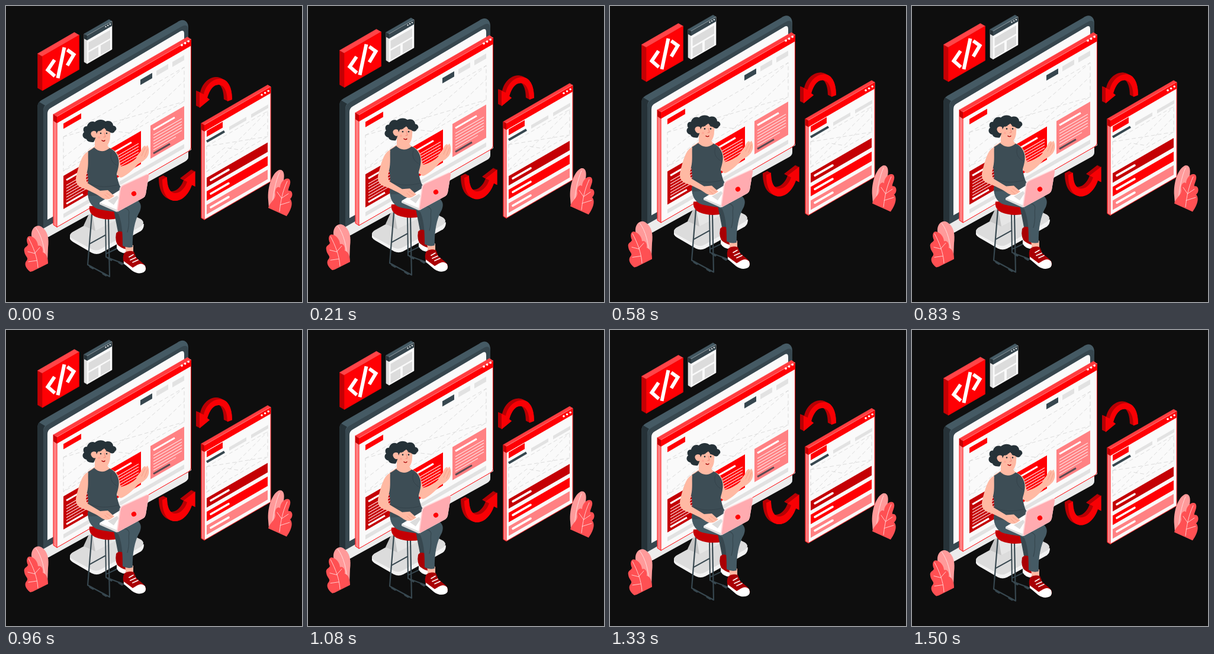
An HTML page that plays this animation: 500x500 px, repeating every 1.54 s.

```html
<!DOCTYPE html>
<html lang="en">
<head>
<meta charset="utf-8">
<title>Web design</title>
<style>
html, body { margin: 0; width: 100%; height: 100%; overflow: hidden; background: #0e0e0e; }
svg { display: block; width: 100vw; height: 100vh; }
</style>
</head>
<body>
<svg id="stage" viewBox="0 0 500 500"></svg>
<script>
const K = 0.577; // slope of the isometric right-hand axis
const RED = '#ff0004', DEEP = '#c40004', PINK = '#ff8183', PAPER = '#fafafa',
      GREY = '#e2e2e2', SLATE = '#455a64', INK = '#37474f', NIGHT = '#263238', SKIN = '#ffb9a3';

const fill = (d, c, extra = '') => `<path d="${d}" fill="${c}" ${extra}/>`;
const line = (d, c, w, extra = '') =>
  `<path d="${d}" fill="none" stroke="${c}" stroke-width="${w}" stroke-linecap="round" stroke-linejoin="round" ${extra}/>`;
const quad = (x, y, w, h, c, extra) => fill(`M${x},${y}l${w},${-w * K}v${h}l${-w},${w * K}z`, c, extra);
const rule = (x, y, w, c, t) => line(`M${x},${y}l${w},${-w * K}`, c, t, 'style="stroke-linecap:butt"');
const dot = (x, y, r, c) => `<circle cx="${x}" cy="${y}" r="${r}" fill="${c}"/>`;
const range = n => [...Array(n).keys()];

// Slab seen from the left and above; x, y is the front top-left corner
function slab(x, y, w, h, dx, dy, front, top, side) {
  const soft = c => `stroke="${c}" stroke-width=".6" stroke-linejoin="round"`;
  return fill(`M${x},${y}l${-dx},${-dy}v${h}l${dx},${dy}z`, side, soft(side)) +
    fill(`M${x},${y}l${-dx},${-dy}l${w},${-w * K}l${dx},${dy}z`, top, soft(top)) +
    quad(x, y, w, h, front, soft(front));
}

function dots(x, y, step, r) {
  return range(3).map(i => dot(x + i * step, y - i * step * K, r, '#fff')).join('');
}

function dashes(x, y, w, h) {
  const rise = w * K, top = y - rise, r = x + w;
  return line(`M${x},${y}L${r},${top}V${top + h}L${x},${y + h}Z` +
    `M${x},${y + h}L${r},${top}M${x},${y}L${r},${top + h}` +
    `M${x},${y + h * .6}l${w * .3},${-rise * .4}l${w * .25},${h * .1}L${r},${top + h * .4}`,
    '#d3d3d3', .8, 'stroke-dasharray="6 5"');
}

function monitor() {
  return fill('M108,387V393Q109,396 114,399L145,417Q153,421 161,417L228,380Q233,376 233,368Z', '#f2f2f2') +
    fill('M112,382L188,340L228,360Q236,366 228,372L161,410Q153,415 145,411L112,393Q104,388 112,382Z', '#dcdcdc') +
    fill('M131,371L143,345L196,320L194,358L151,380Z', '#c6c6c6') +
    fill('M146,352L196,325L194,358L151,380Z', '#e6e6e6') +
    fill('M53,172Q53,163 60,159L289,27.5Q298,21 304,26Q308,29 308,38V258L63,386L53,376Z', SLATE) +
    fill('M53,172Q53,165 56,162L66,168Q63,171 63,177V388L53,379Z', NIGHT) +
    fill('M63,179Q63,170 70,166L296,35Q308,28 308,42V240L63,380Z', INK) +
    fill('M70,182Q70,175 76,172L294,43Q301,39 301,47V232L70,361Z', PAPER) +
    fill('M63,376L308,237V254Q308,260 302,263L72,390Q63,393 63,387Z', '#ececec');
}

function card(x, y, c, end) {
  const lines = range(6).map(i => rule(x + 5, y + 16 + i * 5, i === 5 ? 38 : 48, '#ffe3e3', 1.1)).join('');
  return quad(x, y, 57, 56, c) + rule(x + 5, y + 7, 36, '#fff', 3) + lines + rule(x + 5, y + 47, 28, end, 3);
}

function bigWindow() {
  return slab(86, 187, 226.500, 186.500, 6, 4, PAPER, '#ff3d40', PINK) +
    line('M86,187V373.500L308,245.500Q312.500,243 312.500,239V57', RED, 1) +
    line('M80,183V369.500L86,373.500', RED, .8) +
    quad(86, 187, 226.500, 11, RED) +
    fill('M80,183L86,187V198L80,194Z', DEEP) + dots(297, 66, 5.600, 1.900) +
    quad(97, 198.500, 30, 9, RED) + quad(227, 124.500, 20, 9, INK) +
    quad(254, 109.500, 20, 8.500, GREY) + quad(281, 94.500, 20, 8.500, GREY) +
    dashes(97, 221, 204, 58) +
    card(97, 287, DEEP, '#fff') + card(171, 244, RED, '#fff') + card(244, 202, PINK, '#5b4a52') +
    quad(97, 351, 204, 7, GREY);
}

function sideWindow() {
  const bands = [DEEP, RED, PINK].map((c, i) => {
    const y = 290 + i * 23;
    return quad(339, y, 103, 16, c) + line(`M346,${y + 4}l30,${-30 * K}`, '#fff', 3.6);
  }).join('');
  return slab(335, 201, 112, 160, 5, 3, PAPER, '#ff3d40', PINK) +
    line('M330,198V358L335,361L447,296.400V137M335,201V361', RED, .9) +
    quad(335, 201, 112, 11, RED) + fill('M330,198L335,201V212L330,209Z', DEEP) +
    dots(432, 150, 5.6, 1.8) +
    quad(339, 211, 27, 10, RED) + rule(339, 229, 30, INK, 4) +
    quad(377, 204, 29, 6, GREY) + quad(414, 183, 29, 6, GREY) +
    dashes(339, 237, 103, 43) + bands;
}

function smallWindow() {
  return slab(137, 50, 42, 47.5, 5, 3, PAPER, SLATE, '#dedede') +
    quad(137, 50, 42, 8, INK) + fill('M131.7,47L137,50V58L131.7,55Z', NIGHT) +
    dots(168.5, 35, 3.7, 1.1) +
    quad(139.5, 61.5, 36.5, 14, '#dcdcdc') +
    quad(139.5, 78.5, 16.5, 15.5, '#dcdcdc') + quad(160, 66.5, 16, 16, '#dcdcdc');
}

function icon() {
  return slab(61.5, 85, 62, 58, 8, 4.6, RED, '#ff4448', DEEP) +
    `<g fill="none" stroke="#fff" stroke-width="6">
      <path d="M82,91L70.5,108L82.500,118.500M103.500,74L114.500,82L103.500,100.500M98.500,70L87.500,122"/></g>`;
}

function arrow(d) {
  const back = range(7).map(i => `<path d="${d}" fill="#b70004" transform="translate(${-6 + i},${-3 + i / 2})"/>`);
  return back.join('') + fill(d, '#f80004');
}

function leaves() {
  const RIB = '#ffd9d9', LEAF = '#ff5053', PALE = '#ff9a9a';
  return fill('M443,328C441,305 450,282 461,277C469,275 471,284 469,294L464,345L444,341Z', PALE) +
    line('M462,281C455,297 451,318 450,338', RIB, 1) +
    fill('M443,341C446,331 455,327 455,319C453,309 459,303 463,307C463,297 473,288 479,293C483,299 476,308 477,312C484,310 486,321 480,326C486,333 481,345 474,355Z', LEAF) +
    line('M475,296C467,313 464,330 462,347M465,325L477,317M463,336L479,331M465,324L458,314', RIB, .9) +
    fill('M43,388C42,375 52,368 60,373C71,380 73,394 71,408L70,434L52,440Z', PALE) +
    line('M50,374C60,387 66,409 66,432', RIB, 1) +
    fill('M41,449C33,443 30,435 35,430C39,425 32,423 31,415C29,407 36,407 37,403C33,394 36,387 42,389C49,391 54,399 54,405C61,403 63,411 62,416C68,417 71,426 71,435L45,448Z', LEAF) +
    line('M38,392C46,407 53,424 54,442M49,418L37,415M52,430L38,432M49,417L57,408', RIB, .9);
}

function stool() {
  return line('M168,355L169,424M190,355L197,412M141,402L168,387M169,424L206,438M170,418L191,408', INK, 2) +
    line('M145,352L138,437L175,457L173,358', INK, 2.2) +
    line('M142,440L147,443M164,452L169,455M173,426L178,429M191,433L196,436', INK, 3.4) +
    fill('M141,338Q139,350 151,356Q168,363 189,359L190,336Z', '#c40004');
}

function legs() {
  return fill('M182,345L212,340L203,386L189,381Z', INK) +
    fill('M186,384Q190,378 198,382L203,413L192,408Q183,399 186,384Z', '#a90004') +
    fill('M187,402Q194,409 203,411L202,418Q191,417 187,409Z', '#fff') +
    fill('M201,403L215,404L215,419L203,420Z', SKIN) +
    fill('M138,314C138,328 143,339 156,343C172,347 184,346 190,351C197,368 197,390 197,405Q206,410 214,407C213,386 217,362 226,347C232,333 223,326 208,321L190,301Z', SLATE) +
    line('M183,343C195,338 207,341 208,348C206,358 210,366 205,382', INK, 1.2) +
    fill('M200,417Q207,412 216,415L220,425L233,436Q239,443 234,448Q226,453 217,449L199,434Q196,424 200,417Z', '#a90004') +
    fill('M219,439Q229,432 235,439Q238,447 232,450Q223,454 213,447L199,435L199,431L214,442Z', '#fff') +
    line('M208,424L215,420M210,429L219,425M214,433L223,429', '#fff', 1.7);
}

function body() {
  return fill('M174,240C184,242 190,250 191,258L194,271C204,269 214,263 220,257C222,250 227,248 229,242C232,236 236,234 236,238L239,235C243,242 242,250 238,256C233,262 228,264 222,268C212,279 203,287 194,290C187,288 184,276 181,262Z', SKIN) +
    line('M229,253L235,240M234,255L239,242', '#f0957f', .7) +
    fill('M150,225L150,237L138,245L150,253H174L180,243L173,238L168,230Z', SKIN) +
    fill('M138,246C143,243 146,241 149,239Q161,251 175,240C183,243 188,250 190,258C192,267 189,276 187,283C188,292 190,297 192,304L187,319L139,321C138,305 140,292 137,280C134,266 135,251 138,246Z', '#3d4d55') +
    line('M178,247C174,258 181,266 187,269M142,300C155,307 174,306 189,302', NIGHT, .8, 'opacity=".45"');
}

function laptop() {
  return fill('M158,332L192,311L199,318L187,347Z', '#fff') +
    fill('M158,332L187,344V348L158,335Z', '#dedede') +
    fill('M172,329L188,320L190,324L182,336Z', '#dcdcdc') +
    fill('M192,308Q193,304 197,302L237,284Q242,282 241,288L236,318Q235,322 232,324L190,347Q186,349 187,344Z', '#ffd7d9') +
    fill('M194,308Q195,305 198,303.5L238,285Q242,284 241,288L236,318Q235,322 232,324L191,346Q188,347 189,343Z', '#ffabb0') +
    `<ellipse cx="216" cy="317" rx="4.2" ry="4" fill="${RED}" transform="rotate(-30 216 317)"/>` +
    fill('M139,246C129,249 124,266 119,286C116,297 120,304 128,307C141,312 150,316 159,322C165,327 172,328 177,325L183,321L172,311L159,312L139,300C134,296 135,288 137,280C140,268 138,254 139,246Z', SKIN) +
    line('M167,319L174,325M170,316L179,322', '#f0957f', .7);
}

function head() {
  return fill('M150,206L150,226C150,237 157,242 163,241C171,239 176,230 176,220L177,206L160,199Z', SKIN) +
    fill('M148,230C141,230 137,229 136,225C130,224 127,217 132,213C129,208 131,203 137,203C138,197 145,193 150,196C155,191 164,191 168,195C174,192 181,196 181,202C187,203 188,209 184,211C182,216 177,215 174,212C170,211 168,208 166,206C162,210 157,210 155,212C152,216 152,224 148,230Z', NIGHT) +
    fill('M152,212C146,209 142,214 144,218C146,223 151,224 154,220Z', SKIN) +
    dot(160, 215, 1.3, NIGHT) + dot(170, 215, 1.3, NIGHT) +
    line('M157,211L161,209.500M169,210L173,211', NIGHT, 1.1) +
    line('M166,214L168,221L165,221.500', '#ee8273', .9) +
    line('M162,227Q165,229.500 167,227', '#a90004', 1.4) +
    dot(157, 222, 2, '#ffa996');
}

const stage = document.getElementById('stage');
stage.innerHTML = `<g id="scene">${[
  monitor(), bigWindow(), smallWindow(),
  arrow('M382,158C382,136 374,122 360,123C347,124 337,135 334,149L327,146L327,172L344,158L340,155C344,141 351,132 360,133C370,134 374,147 374,161Z'),
  sideWindow(),
  arrow('M264,293L272,289C272,306 277,317 287,316C296,315 303,306 306,297L300,294L319.5,279L319.5,305L314,302C310,315 300,328 287,329C272,330 264,315 264,293Z'),
  leaves(), stool(), legs(), body(), laptop(), head()
].join('')}</g><g id="icon">${icon()}</g>`;

const scene = document.getElementById('scene'), badge = document.getElementById('icon');
const LOOP = 1540, STEPS = 37, LEAD = 1.5;

// Linear float up and back down, stepped at 24 pictures a second
function draw(ms) {
  const step = Math.floor((ms + 4) / LOOP * STEPS) % STEPS;
  const phase = (step + LEAD) / STEPS % 1;
  const lift = 0.8 - 10 * (1 - Math.abs(1 - 2 * phase));
  scene.setAttribute('transform', `translate(0 ${lift.toFixed(3)})`);
  badge.setAttribute('transform', `translate(0 ${(2 * lift).toFixed(3)})`);
}

const start = performance.now();
function tick() {
  draw(performance.now() - start);
  requestAnimationFrame(tick);
}
draw(0);
requestAnimationFrame(tick);
</script>
</body>
</html>
```
